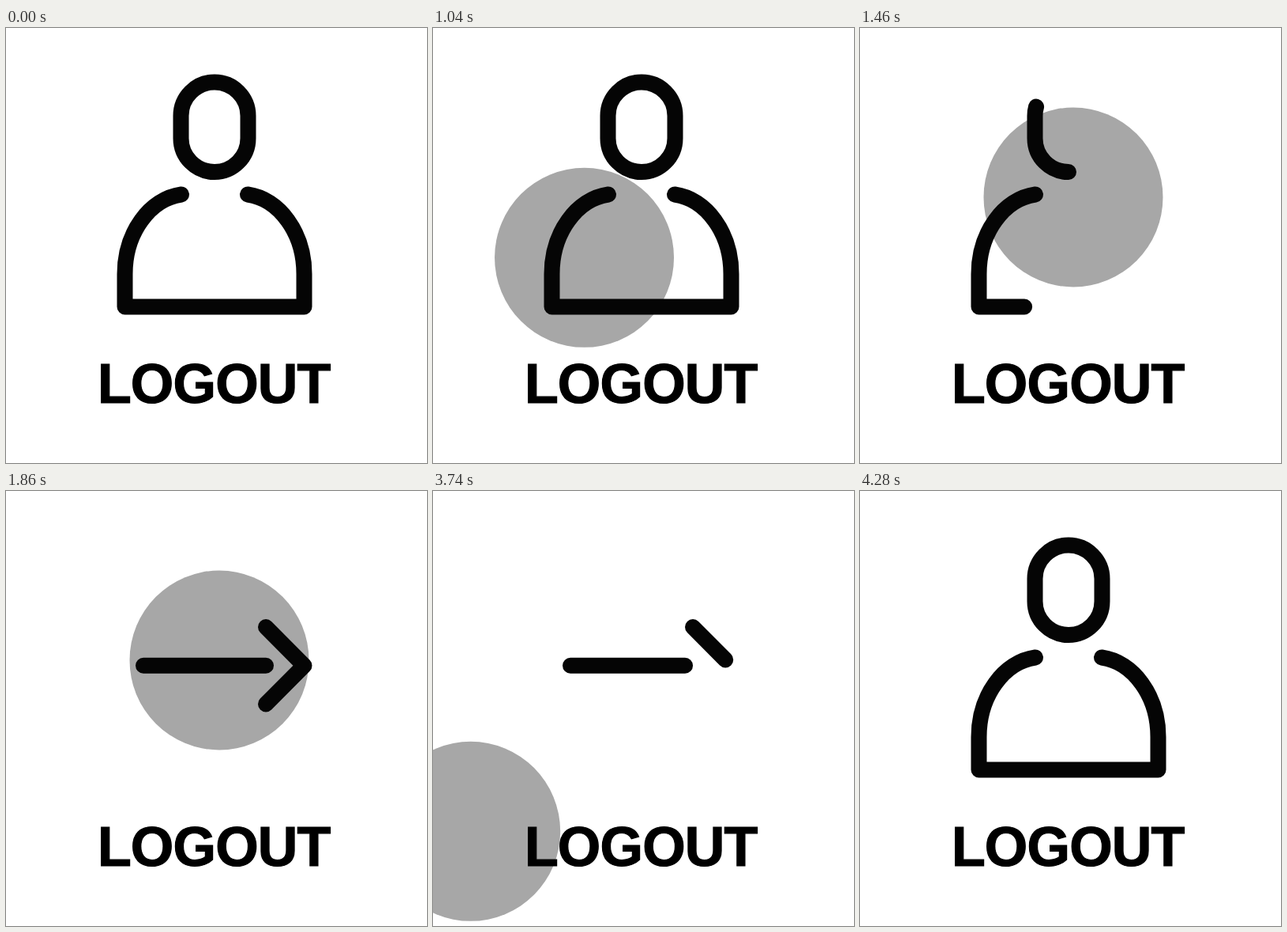
An HTML page that plays this animation: 533 by 550 pixels, repeating every 5980 ms.

```html
<!DOCTYPE html>
<html lang="en">
<head>
<meta charset="utf-8">
<title>Logout</title>
<style>
  html, body { margin: 0; width: 100%; height: 100%; overflow: hidden; background: #fff; }
  svg { display: block; width: 533px; height: 550px; }
  path { fill: none; stroke: #050505; stroke-width: 20; stroke-linecap: round; stroke-linejoin: round; }
  text {
    font: bold 70px "Liberation Sans", Arial, sans-serif;
    letter-spacing: -.8px;
    stroke: #000;
    stroke-width: 1.2;
  }
</style>
</head>
<body>
<svg viewBox="0 0 533 550">
  <circle id="disc" cx="270" cy="214" r="113.5" fill="#a7a7a7"/>
  <path id="head" pathLength="1" d="M264 182A42.5 42.5 0 0 1 221.5 139.5V111A42.5 42.5 0 0 1 306.5 111V139.5A42.5 42.5 0 0 1 264 182"/>
  <path id="body" pathLength="1" d="M222 210.5C182 216 150.5 259 150.5 311V352.5H377.5V311C377.5 259 346 216 306 210.5"/>
  <path id="shaft" pathLength="1" d="M174 220.7H329"/>
  <path id="tip" pathLength="1" d="M329 172L377.5 220.7L329 269.4"/>
  <text x="115.9" y="473.7">LOGOUT</text>
</svg>
<script>
const LOOP = 5980, TRAVEL = 425;
const $ = id => document.getElementById(id);

function bezier(x1, y1, x2, y2) {
  const at = (a, b, s) => 3 * (1 - s) ** 2 * s * a + 3 * (1 - s) * s * s * b + s ** 3;
  return x => {
    let lo = 0, hi = 1;
    for (let i = 0; i < 24; i++) {
      const mid = (lo + hi) / 2;
      if (at(x1, x2, mid) < x) lo = mid; else hi = mid;
    }
    return at(y1, y2, lo);
  };
}

const ease = bezier(.25, .1, .25, 1);
const easeOut = bezier(0, 0, .58, 1);
const linear = x => x;

function span(t, start, duration, curve = linear) {
  const x = (t - start) / duration;
  return x <= 0 ? 0 : x >= 1 ? 1 : curve(x);
}

// Shows the first part of a stroke; an empty stroke must not leave its round cap.
function reveal(id, part) {
  const el = $(id);
  el.style.visibility = part > 0 ? "visible" : "hidden";
  el.setAttribute("stroke-dasharray", part < 1 ? `${part} 2` : "none");
}

function draw(t) {
  const away = TRAVEL * (1 - span(t, 830, 411, ease) + span(t, 3558, 600, ease));
  $("disc").setAttribute("transform", `translate(${-away} ${away * .973})`);

  const redraw = span(t, 3972, 300, easeOut);
  reveal("head", 1 - span(t, 1260, 300) + redraw);
  reveal("body", 1 - span(t, 1282, 300) + redraw);
  reveal("shaft", span(t, 1560, 200) - span(t, 3725, 250));
  reveal("tip", span(t, 1660, 200) - span(t, 3580, 280));
}

function frame() {
  draw(performance.now() % LOOP);
  requestAnimationFrame(frame);
}
frame();
</script>
</body>
</html>
```
